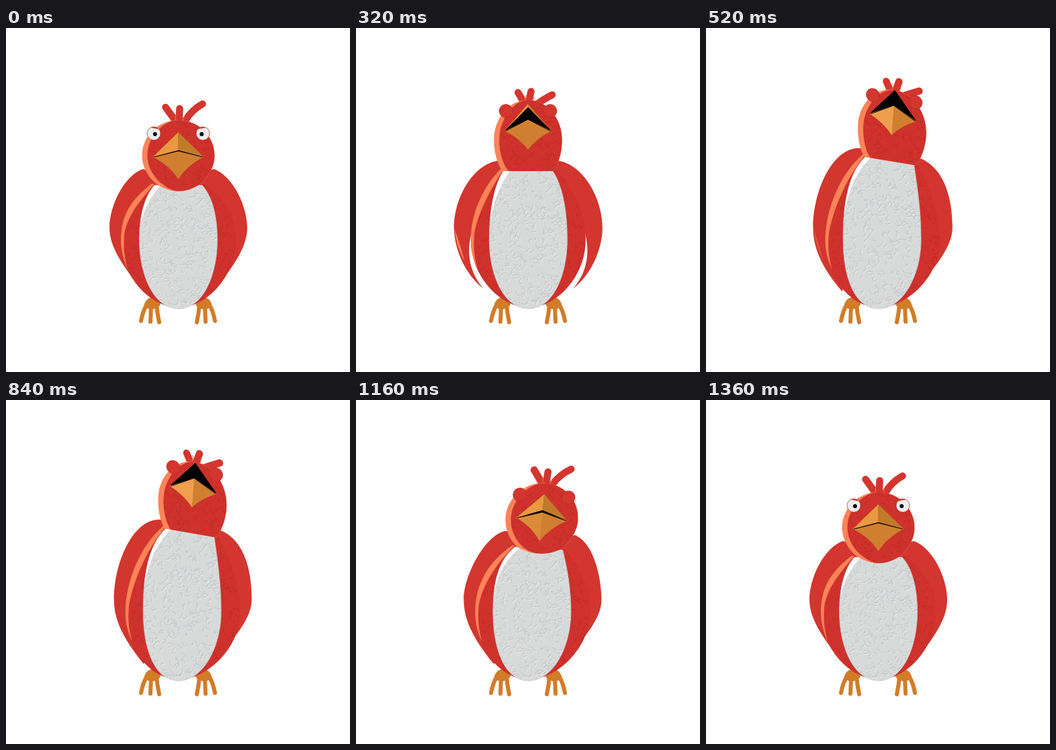
An HTML page with a canvas that plays this animation: 512x512 px, repeating every 1640 ms.

```html
<!DOCTYPE html>
<html lang="en">
<head>
<meta charset="utf-8">
<title>Red bird</title>
<style>
  html, body { margin: 0; height: 100%; overflow: hidden; background: #fff; }
  canvas { display: block; width: 100vw; height: 100vh; }
</style>
</head>
<body>
<canvas id="stage" width="512" height="512"></canvas>
<script>
const ctx = document.getElementById('stage').getContext('2d');
const LOOP = 1640, STEP = 40, AXIS = 256.5;
const RED = '#cf322c', WING = '#d2362f', GLOW = '#fe8358', FOOT = '#d27c28';

// Pose tracks: head place, tilt and lean, stretch, pitch of the face, beak, lids.
const TIMES = [0, 160, 320, 540, 800, 1000, 1160, 1360];
const TRACKS = {
  x: [256.5, 256.5, 256, 277.5, 277.5, 277.5, 276.5, 256.5],
  y: [190, 186, 167, 152, 152, 155, 177, 190],
  tilt: [0, 0, 0, .17, .17, .19, .06, 0],
  lean: [0, 0, 0, .07, .07, .08, .1, 0],
  stretch: [0, .35, 1, 1, 1, .8, .05, 0],
  pitch: [0, 7, 21, 28, 28, 17, 2, 0],
  lip: [-7, -18, -31, -37, -37, -21, -10, -7],
  gap: [1, 5, 18, 23, 23, 22, 3, 1],
  lid: [.14, 0, 1, 1, 1, 1, 1, .14]
};
const SPREAD_TIMES = [0, 160, 240, 320, 520, 600];
const SPREAD = [0, 1, 1.3, 1, .15, 0];

// Smooth interpolation that never overshoots its keys.
function sample(times, values, t) {
  const last = times.length - 1;
  if (t >= times[last]) return values[last];
  const i = times.findIndex(k => k > t) - 1;
  const secant = j => (values[j + 1] - values[j]) / (times[j + 1] - times[j]);
  const slope = j => {
    if (j === 0 || j === last) return 0;
    const a = secant(j - 1), b = secant(j);
    return a * b > 0 ? 2 * a * b / (a + b) : 0;
  };
  const d = times[i + 1] - times[i], k = (t - times[i]) / d;
  return values[i] + (values[i + 1] - values[i]) * k * k * (3 - 2 * k)
    + d * (slope(i) * k * (1 - k) ** 2 - slope(i + 1) * k * k * (1 - k));
}

let seed = 7;
const random = () => (seed = seed * 16807 % 2147483647) / 2147483647;

// Short crooked strokes that stand for the plaster surface.
function flecks(count, width, height) {
  const path = new Path2D();
  for (let i = 0; i < count; i++) {
    let x = (random() - .5) * width, y = random() * height;
    path.moveTo(x, y);
    for (let j = 0; j < 3; j++) path.lineTo(x += random() * 8 - 4, y += random() * 7 - 3);
  }
  return path;
}
const grain = { belly: flecks(400, 124, 200), torso: flecks(300, 180, 200), head: flecks(150, 112, 120) };

function texture(path, color, x, y, stretch = 1) {
  ctx.save();
  ctx.translate(x, y);
  ctx.scale(1, stretch);
  ctx.strokeStyle = color;
  ctx.lineWidth = 1.3;
  ctx.stroke(path);
  ctx.restore();
}

function shape(color, d) {
  const path = new Path2D(d);
  ctx.fillStyle = color;
  ctx.fill(path);
  return path;
}

function line(color, width, d) {
  ctx.strokeStyle = color;
  ctx.lineWidth = width;
  ctx.stroke(new Path2D(d));
}

function within(path, draw) {
  ctx.save();
  ctx.clip(path);
  draw();
  ctx.restore();
}

function feet() {
  for (const side of [-1, 1]) {
    ctx.save();
    ctx.translate(256, 0);
    ctx.scale(side, 1);
    shape(FOOT, 'M26 411C27 397 46 397 50 411C49 421 30 421 26 411Z');
    line(FOOT, 6, 'M46 411Q52 420 55 436M40 413L41 437M32 411Q31 424 28 438');
    ctx.restore();
  }
}

function wing(p, side, at, mid) {
  const X = v => mid + side * v, tipX = v => AXIS + side * v;
  const s = p.spread, q = p.pitch, drop = 65 * side * p.tilt;
  const [sx, sy] = at(side * (53 - .4 * q), 20 + .5 * q);
  const outer = 102.5 + 8 * s;
  shape(WING, `M${sx} ${sy}
    C${sx + side * (28 + .5 * q)} ${sy + 10 - .2 * q + drop} ${X(outer)} ${265 - .5 * q + drop} ${X(outer)} 297
    C${X(outer)} 325 ${tipX(84.5 + 12 * s)} ${352 + 13 * s} ${tipX(51.5 + 15 * s)} ${393 - 5 * s}
    C${tipX(40 + 40 * s)} 373 ${X(70 + 25 * s)} 345 ${X(84.5)} 305
    L${X(30)} 300 L${at(0, 30)}Z`);
  if (side < 0) {
    ctx.globalAlpha = Math.min(1, s * 2);
    shape(GLOW, `M${X(outer - 1)} 299Q${X(outer - 3)} 325 ${X(outer - 16)} 348Q${X(outer - 10)} 325 ${X(outer - 1)} 299Z`);
    ctx.globalAlpha = 1;
  }
}

function torso(p, at, mid) {
  const [lx, ly] = at(-40, 42), [rx, ry] = at(40, 42);
  const l = mid - 85.5, r = mid + 85.5;
  const neck = y => y + .25 * (315 - y);
  const body = shape(RED, `M257 416C215 416 ${l} 370 ${l} 315C${l} 275 ${l + 19} ${neck(ly)} ${lx} ${ly}
    L${rx} ${ry}C${r - 19} ${neck(ry)} ${r} 275 ${r} 315C${r} 370 298 416 257 416Z`);
  within(body, () => {
    texture(grain.torso, 'rgba(165,30,28,.26)', mid, ly, (416 - ly) / 200);
    shape(GLOW, `M${lx - 2} ${ly - 2}C${l + 19} ${neck(ly)} ${l - 1} 275 ${l - 1} 315C${l} 335 ${l + 5} 348 ${l + 10} 360
      C${l + 4} 335 ${l + 4} 328 ${l + 5} 308C${l + 9} 280 ${l + 28} ${neck(ly) + 5} ${lx + 6} ${ly - 2}Z`);
  });
}

function belly(p, at) {
  const [lx, ly] = at(-35.5, 44), [rx, ry] = at(35.5, 44);
  const mid = AXIS + (p.x - AXIS) * .27, l = mid - 58, r = mid + 58;
  const along = (y, k) => y + k * (315 - y);
  const front = shape('#d8dada', `M257 418C220 418 ${l} 368 ${l} 315C${l} ${along(ly, .55)} ${l + 8} ${along(ly, .2)} ${lx} ${ly}
    L${rx} ${ry}C${r - 8} ${along(ry, .2)} ${r} ${along(ry, .55)} ${r} 315C${r} 368 293 418 257 418Z`);
  within(front, () => {
    const stretch = (418 - ly) / 200;
    texture(grain.belly, 'rgba(232,234,234,.7)', mid + 1.2, ly + 1.2, stretch);
    texture(grain.belly, 'rgba(182,186,187,.5)', mid, ly, stretch);
    shape('#fff', `M${lx - 3} ${ly - 3}C${l + 6} ${along(ly, .2)} ${l} ${along(ly, .5)} ${l + 2} ${along(ly, .7)}
      C${l + 6} ${along(ly, .5)} ${l + 14} ${along(ly, .22)} ${lx + 12} ${ly - 3}Z`);
  });
  ctx.strokeStyle = '#c9cacb';
  ctx.lineWidth = .7;
  ctx.stroke(front);
}

function skull(p, inset) {
  const w = 54 - 3.2 * p.stretch, left = inset - w, top = -53 - 7 * p.stretch;
  const flat = Math.min(1, 3 * p.stretch), c = 30 + 8 * flat, b = 44 + 2 * p.stretch;
  const bulge = w - .4 * (w - c), k = .55;
  return `M${left} 0C${left} ${k * top} ${-k * w + inset} ${top} 0 ${top}
    C${k * w} ${top} ${w} ${k * top} ${w} 0C${w} ${.37 * b} ${bulge} ${.78 * b} ${c} ${b}
    Q0 ${b + 18 * (1 - flat)} ${inset * 1.1 - c} ${b}C${inset - bulge} ${.78 * b} ${left} ${.37 * b} ${left} 0Z`;
}

function crest(p) {
  const q = p.pitch, base = -50 - .3 * q;
  line(WING, 10.5, `M${-3 - .15 * q} ${base}L${-19 + .2 * q} ${-72 + .05 * q}
    M1 ${base}L${2 + .12 * q} ${-70 - .12 * q}
    M${11 + .15 * q} ${base - 3 + .25 * q}Q${20 + .15 * q} ${-68 + .33 * q} 36 ${-77 + .45 * q}`);
  line(GLOW, .8, `M-4 ${base}L-4 ${base - 11}M7 ${base}L9 ${base - 9}`);
}

function eye(p, side) {
  ctx.save();
  ctx.translate(side * (36.5 - .17 * p.pitch), -33 - .5 * p.pitch);
  const ball = new Path2D();
  ball.arc(0, 0, 10, 0, 7);
  ctx.fillStyle = WING;
  ctx.fill(ball);
  if (p.lid < .97) within(ball, () => {
    const y = -11 + 22 * p.lid;
    shape('#eeeeee', `M${-side * 11} ${y + 2}L${side * 11} ${y - 2}V12H${-side * 11}Z`);
    const pupil = new Path2D();
    pupil.arc(-side * 1.8, 1, 3, 0, 7);
    ctx.fillStyle = '#000';
    ctx.fill(pupil);
    if (y > -2) shape(WING, `M-11 -11H11V${y - side * 2}L-11 ${y + side * 2}Z`);
  });
  ctx.strokeStyle = '#b32a26';
  ctx.lineWidth = .6;
  ctx.stroke(ball);
  ctx.restore();
}

function beak(p) {
  const q = p.pitch, w = 38 - 3 * p.stretch, corner = 2 - .75 * q;
  const top = -35 - .9 * q, chin = 35 - q, upper = p.lip - p.gap;
  const curve = corner + .38 * (chin - corner);
  const jaw = side => `M0 ${p.lip}L${side * w} ${corner}Q${side * 13} ${curve} 0 ${chin}Z`;
  shape('#e9993f', `M0 ${top}L${-w} ${corner}L0 ${upper}Z`);
  shape('#bf7b2a', `M0 ${top}L${w} ${corner}L0 ${upper}Z`);
  shape('#000', `M${-w} ${corner}L0 ${upper}L${w} ${corner}L0 ${p.lip + 1}Z`);
  shape('#cf7f2f', `M${-w} ${corner}L0 ${p.lip}L${w} ${corner}Q13 ${curve} 0 ${chin}Q-13 ${curve} ${-w} ${corner}Z`);
  // The left half catches the light as the head turns.
  ctx.globalAlpha = Math.min(1, 5 * p.tilt);
  shape('#f5a552', jaw(-1));
  ctx.globalAlpha = 1;
  line('#000', .9, `M${-w + 2} ${corner}L0 ${p.lip}L${w - 2} ${corner}`);
}

function head(p) {
  ctx.save();
  ctx.transform(1, p.tilt, -p.lean, 1, p.x, p.y);
  crest(p);
  within(shape(GLOW, skull(p, 0)), () => {
    within(shape(RED, skull(p, 8)), () => texture(grain.head, 'rgba(165,30,28,.22)', 0, -60));
  });
  eye(p, -1);
  eye(p, 1);
  beak(p);
  ctx.restore();
}

function draw(now) {
  const t = Math.floor(now % LOOP / STEP) * STEP;
  const p = { spread: sample(SPREAD_TIMES, SPREAD, t) };
  for (const name in TRACKS) p[name] = sample(TIMES, TRACKS[name], t);
  const at = (x, y) => [p.x + x - p.lean * y, p.y + y + p.tilt * x];
  const mid = AXIS + (p.x - AXIS) * .32;

  ctx.fillStyle = '#fff';
  ctx.fillRect(0, 0, 512, 512);
  ctx.lineCap = ctx.lineJoin = 'round';
  feet();
  wing(p, -1, at, mid);
  wing(p, 1, at, mid);
  torso(p, at, mid);
  belly(p, at);
  head(p);
  requestAnimationFrame(draw);
}
draw(performance.now());
</script>
</body>
</html>
```
